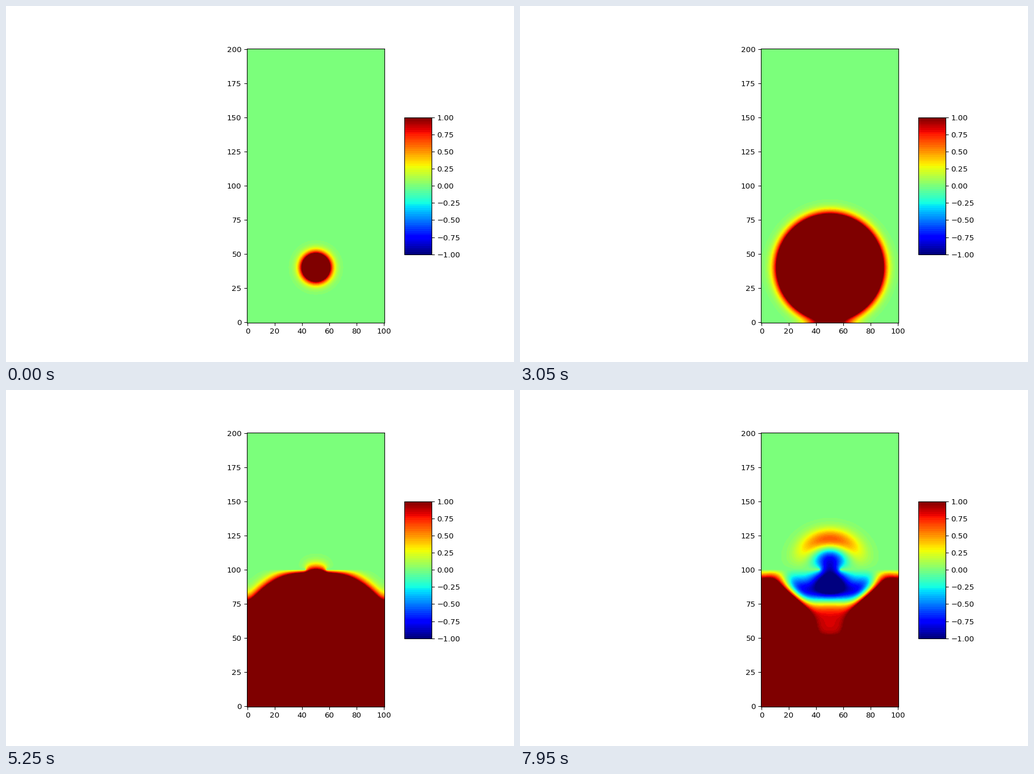
Animation of 894 by 626 pixels, one loop 8 s. Source, as a matplotlib script:

```python
import numpy as np
import matplotlib.pyplot as plt
from matplotlib.animation import FuncAnimation

WIDTH, HEIGHT, DPI = 894, 626, 96
NX, NY = 101, 201
FRAMES, STEP_MS = 160, 50
COURANT = 0.5            # cells travelled per step
SOURCE = (50, 40)
SPREAD = 66.0            # twice the variance of the starting pulse
LEAD_STEPS = 4           # steps run before the first picture
WALL_ROW, SLIT = 100, (43, 58)
BANDS = 65


def laplacian(u):
    p = np.pad(u, 1, mode="edge")
    return p[2:, 1:-1] + p[:-2, 1:-1] + p[1:-1, 2:] + p[1:-1, :-2] - 4 * u


def block(u):
    """Hold the wall at zero, leaving the slit open."""
    u[WALL_ROW, :SLIT[0]] = 0
    u[WALL_ROW, SLIT[1]:] = 0
    return u


def simulate():
    y, x = np.mgrid[:NY, :NX]
    r2 = (x - SOURCE[0]) ** 2 + (y - SOURCE[1]) ** 2
    old, u = np.zeros((NY, NX)), block(np.exp(-r2 / SPREAD))
    waves = []
    for n in range(LEAD_STEPS + FRAMES):
        if n >= LEAD_STEPS:
            waves.append(u)
        old, u = u, block(2 * u - old + COURANT ** 2 * laplacian(u))
    return waves


waves = simulate()

fig, ax = plt.subplots(figsize=(WIDTH / DPI, HEIGHT / DPI), dpi=DPI)
image = ax.imshow(waves[0], origin="lower", vmin=-1, vmax=1,
                  cmap=plt.get_cmap("jet", BANDS))
ax.set_xticks(range(0, 101, 20))
ax.set_yticks(range(0, 201, 25))
fig.colorbar(image, shrink=0.5, aspect=5)


def draw(n):
    image.set_data(waves[n])
    return [image]


anim = FuncAnimation(fig, draw, frames=FRAMES, interval=STEP_MS,
                     repeat=True, repeat_delay=0)
plt.show()
```
